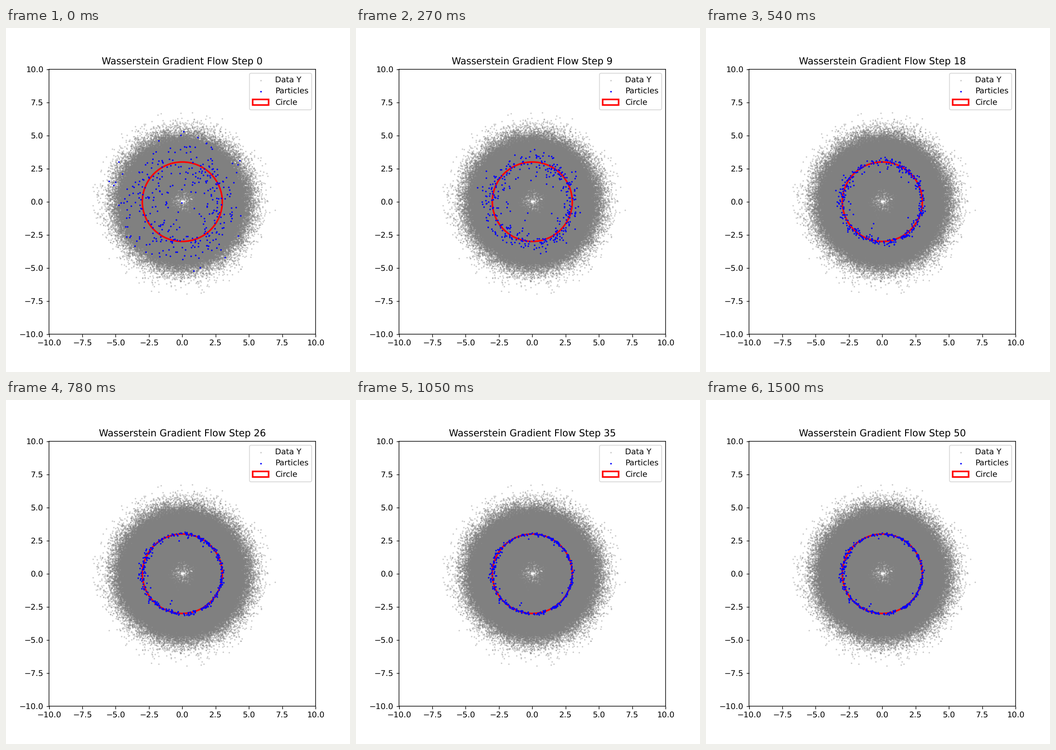
These frames come from a looping animation (748x748 px, 1530 ms). A matplotlib script:

```python
import numpy as np
import matplotlib.pyplot as plt
from matplotlib.animation import FuncAnimation
from matplotlib.patches import Circle, Wedge

SIZE = 748
STEPS = 51
INTERVAL = 30
RADIUS = 3.0
N_DATA = 200_000
N_PARTICLES = 360
BAND = 1.4, 4.2  # radii between which the cloud is fully opaque

plt.rcParams["path.snap"] = False
plt.rcParams["text.hinting"] = "none"
rng = np.random.default_rng(7)


def noisy_ring(n):
    """Polar coordinates of a circle blurred by unit Gaussian noise."""
    angle = rng.uniform(0, 2 * np.pi, n)
    x = RADIUS * np.cos(angle) + rng.normal(size=n)
    y = RADIUS * np.sin(angle) + rng.normal(size=n)
    return np.hypot(x, y), np.arctan2(y, x)


def to_xy(r, angle):
    return np.column_stack([r * np.cos(angle), r * np.sin(angle)])


def draw_cloud(ax):
    inner, outer = BAND
    ax.add_patch(Wedge((0, 0), outer, 0, 360, width=outer - inner,
                       facecolor="gray", edgecolor="none"))
    r, angle = noisy_ring(N_DATA)
    keep = ((r < inner + 0.05) | (r > outer - 0.05)) & (r < 7.3)
    # A tiny gap stays open at the very centre.
    points = to_xy(np.hypot(r[keep], 0.12), angle[keep])
    ax.scatter(*points.T, s=1, color="gray", alpha=0.3, label="Data Y")


start_r, start_angle = noisy_ring(N_PARTICLES)
offset = start_r - RADIUS
# Particles near the centre feel a weaker pull and stop short of the circle.
lag = 1 + np.clip(-offset / 2.85, 0, 1)
spread = np.where(np.cos(start_angle) < -0.7, 0.12, 0.045)
error = rng.normal(size=N_PARTICLES) * spread
error -= 0.5 * np.clip(-offset - 1.5, 0, 1.2)
drift = rng.normal(0, 0.05, N_PARTICLES)


def particle_positions(step):
    progress = 1 - np.exp(-(0.093 * step + 0.0006 * step ** 2))
    pull = progress ** lag
    return to_xy(RADIUS + offset + (error - offset) * pull,
                 start_angle + drift * pull)


fig, ax = plt.subplots(figsize=(6, 6), dpi=SIZE / 6)
ax.set_xlim(-10, 10)
ax.set_ylim(-10, 10)
ax.tick_params(axis="x", pad=3)

draw_cloud(ax)
particles = ax.scatter(*particle_positions(0).T, s=1, color="blue",
                       label="Particles", zorder=1.5)
ax.add_patch(Circle((0, 0), RADIUS, color="red", fill=False,
                    linewidth=2, label="Circle"))
ax.legend(loc="upper right", labelspacing=0.47)
title = ax.set_title("")


def update(step):
    particles.set_offsets(particle_positions(step))
    title.set_text(f"Wasserstein Gradient Flow Step {step}")
    return particles, title


anim = FuncAnimation(fig, update, frames=STEPS, interval=INTERVAL,
                     repeat=True, repeat_delay=0)
plt.show()
```
